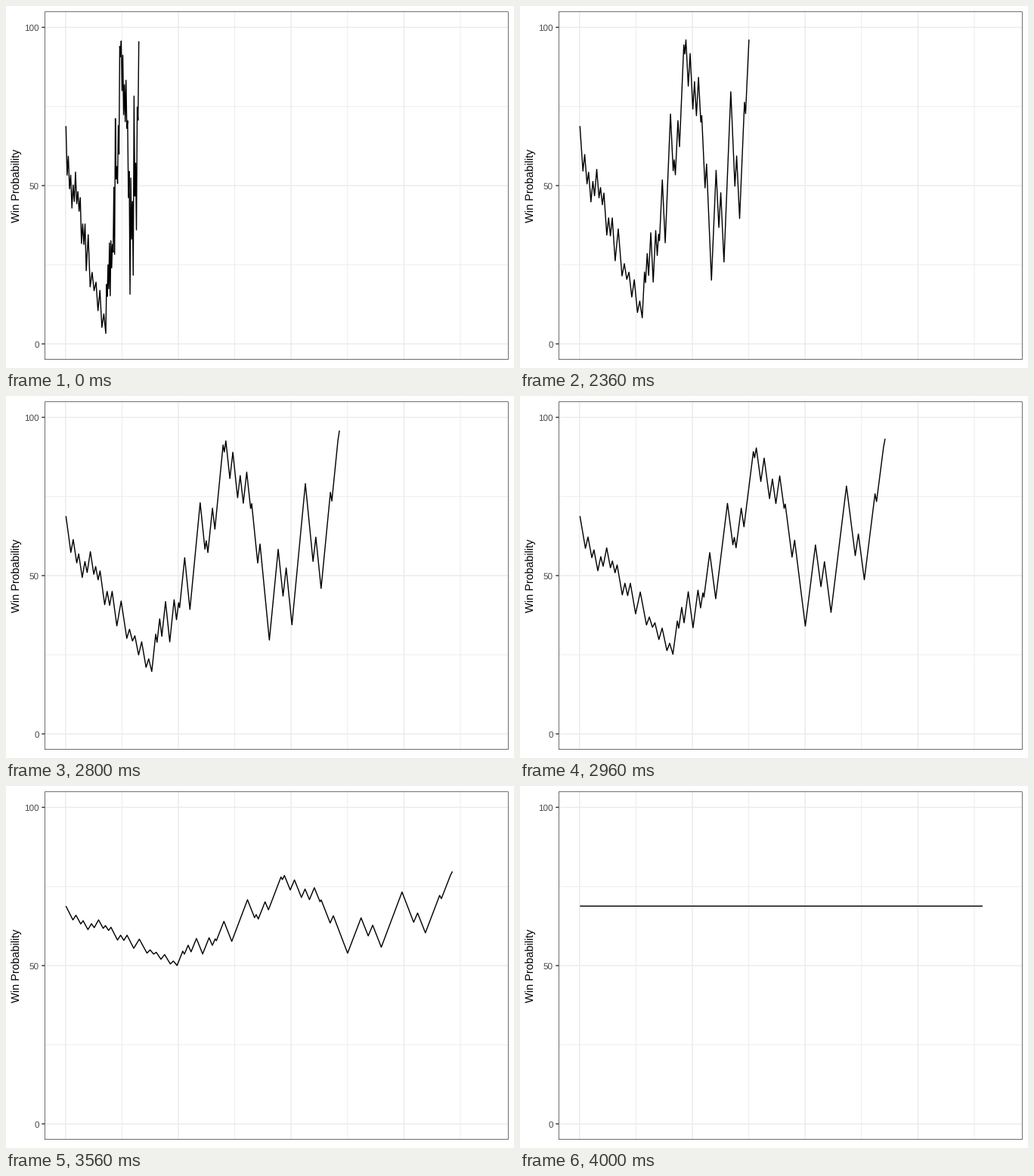
Recreate the animation shown at these times as a matplotlib script. Size 672 by 480 pixels, loop 6 s.

```python
import numpy as np
import matplotlib.pyplot as plt
from matplotlib.animation import FuncAnimation
from matplotlib.patches import Rectangle

plt.rcParams["text.hinting"] = "none"

W, H, DPI = 672, 480, 100
PT = 72 / DPI                      # points per pixel
STEP_MS, FRAMES = 40, 150
HOLD, MOVE = 50, 49                # frames before unfolding, frames of unfolding

LEFT, RIGHT, TOP, BOTTOM = 51, 664.67, 7.33, 469
X0, X_UNIT = 78.8, 149.2 / 300     # pixels at play 0, pixels per play
Y_UNIT = (BOTTOM - TOP) / 110      # pixels per percent, with 5 % margins
Y0 = BOTTOM - 5 * Y_UNIT

# Phases of the game: last play and the main swings in percent, evenly spaced
START = 68.8
PHASES = [
    (55, [53.3, 59.3, 49, 53.3, 42.9, 50.2, 45, 54.3, 44.3, 48.1, 41.9, 46.2,
          31.7, 37.9, 31.4, 37.9, 23.1]),
    (107, [34.5, 18, 22.6, 16.8, 19.5, 10.5, 16.9, 5.2, 9.5, 3.3]),
    (148, [18.8, 15, 25, 17.4, 31.9, 15.2, 32.6, 24, 31.4, 29, 49.5, 28.3,
           71.2, 52.1, 56, 50.7, 69, 60, 94, 90.7, 95.7]),
    (197, [80, 91.2, 72.4, 81.9, 70.2, 83.3, 68.1, 70.5, 46.2, 54.5, 15.7,
           52.4, 33.1, 45, 21.7, 78.3, 46.7, 57.1, 36, 74.8, 70.7, 95.6,
           100.05]),
]
LOW_AT, LENGTH = 305, 1071         # unrolled length up to the low point, and in all


def build_path():
    plays, probs = [1], [START]
    for end, swings in PHASES:
        plays.extend(np.linspace(plays[-1], end, len(swings) + 1)[1:])
        probs.extend(swings)
    return np.array(plays), np.array(probs)


plays, probs = build_path()
dx, dy = np.diff(plays), np.diff(probs)
seg = np.hypot(dx, dy)
angle = np.arctan2(dy, dx)

# Fine jitter too small to draw still adds length once unrolled
low = probs.argmin()
slack = np.empty_like(seg)
slack[:low] = LOW_AT / seg[:low].sum() - 1
slack[low:] = (LENGTH - LOW_AT) / seg[low:].sum() - 1


def unfold(s):
    """Curve with every segment's angle scaled by s; 1 is folded, 0 is flat."""
    step_x = seg * (np.cos(s * angle) + slack * np.cos(s * np.pi / 2))
    step_y = seg * np.sin(s * angle)
    x = plays[0] + np.append(0, np.cumsum(step_x))
    y = probs[0] + np.append(0, np.cumsum(step_y))
    y[y > 100] = np.nan            # beyond the axis limits
    return X0 + X_UNIT * x, Y0 - Y_UNIT * y


fig = plt.figure(figsize=(W / DPI, H / DPI), dpi=DPI, facecolor="white")
ax = fig.add_axes([0, 0, 1, 1])
ax.set_xlim(0, W)
ax.set_ylim(H, 0)
ax.axis("off")


def rule(xs, ys, color, width, z):
    ax.plot(xs, ys, color=color, lw=width * PT, zorder=z, snap=False,
            solid_capstyle="butt")


def grid(x_values, y_values, width, z):
    for v in x_values:
        x = X0 + X_UNIT * v
        rule([x, x], [TOP, BOTTOM], "#ebebeb", width, z)
    for v in y_values:
        y = Y0 - Y_UNIT * v
        rule([LEFT, RIGHT], [y, y], "#ebebeb", width, z)


grid(range(150, 1051, 300), (25, 75), 0.9, 1)
grid(range(0, 901, 300), (0, 50, 100), 1.42, 2)

for v in (0, 50, 100):
    y = Y0 - Y_UNIT * v
    rule([47.3, LEFT], [y, y], "#333333", 1.42, 4)
    ax.text(44, y + 4.4, str(v), ha="right", va="baseline", color="#4d4d4d",
            family="Liberation Sans", size=11.73 * PT)

ax.text(18.3, (TOP + BOTTOM) / 2, "Win Probability", rotation=90,
        rotation_mode="anchor", ha="center", va="baseline", color="black",
        family="Liberation Sans", size=14.67 * PT)

# Only the inner half of the border shows
EDGE = 0.71
ax.add_patch(Rectangle((LEFT + EDGE / 2, TOP + EDGE / 2),
                       RIGHT - LEFT - EDGE, BOTTOM - TOP - EDGE, fill=False,
                       ec="#333333", lw=EDGE * PT, zorder=5, snap=False))

curve, = ax.plot([], [], color="black", lw=1.42 * PT, zorder=3, snap=False,
                 solid_joinstyle="round", solid_capstyle="butt")


def draw(i):
    s = 1 - np.clip((i - HOLD) / MOVE, 0, 1)
    curve.set_data(*unfold(s))
    return curve,


anim = FuncAnimation(fig, draw, frames=FRAMES, interval=STEP_MS,
                     init_func=lambda: draw(0), repeat=True, repeat_delay=0)
plt.show()
```
